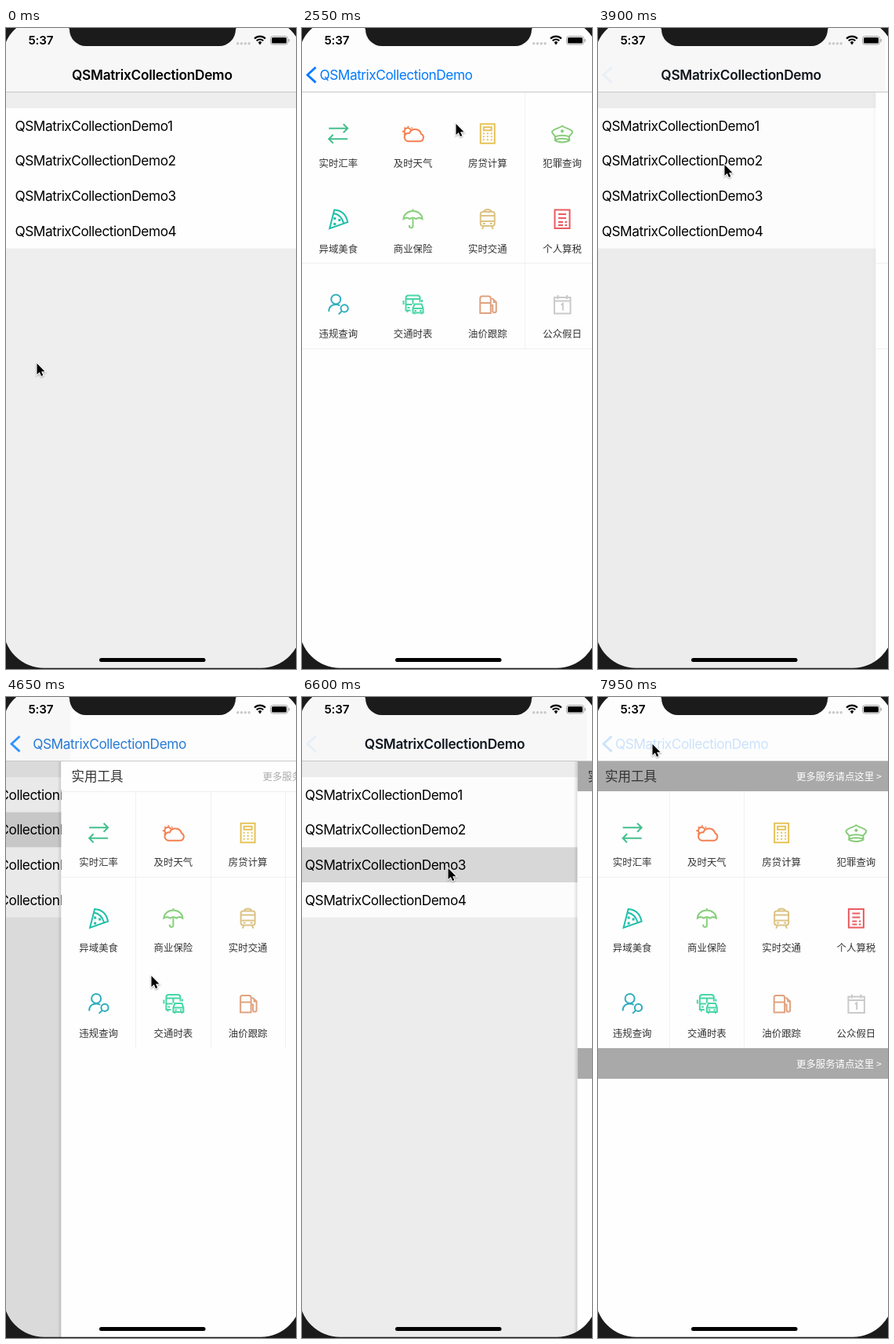
An HTML page with a canvas that plays this animation: 370 by 816 pixels, repeating every 8000 ms.

```html
<!DOCTYPE html>
<html lang="zh-CN">
<head>
<meta charset="utf-8">
<title>QSMatrixCollectionDemo</title>
<style>
html, body { margin: 0; width: 100%; height: 100%; overflow: hidden; background: #1b1b1b; }
canvas { display: block; width: 370px; height: 816px; }
</style>
</head>
<body>
<canvas id="stage" width="370" height="816"></canvas>
<script>
const ctx = document.getElementById('stage').getContext('2d');
const LOOP = 8000, STEP = 150;
const LEFT = -4, WIDTH = 381, CELL_W = WIDTH / 4, CELL_H = 108.8;
const ROW_TOP = 102, ROW_H = 44.65, NAV_H = 82;
const LATIN = 'Inter, "Open Sans", sans-serif';
const CJK = '"Noto Sans CJK SC", "Noto Sans CJK", sans-serif';
const TITLE = 'QSMatrixCollectionDemo';
const MORE = '更多服务请点这里 >';
const BLACK = '#1b1b1b';

// label, colour, stroked path, filled path; all centred on 0,0
const ICONS = [
  ['实时汇率', '#45bf8d', 'M-12-6.5H12M6.5-12L12-6.5L6.5-1M12 7H-12M-6.5 1.5L-12 7L-6.5 12.5'],
  ['及时天气', '#f57f50',
    'M-6.5 10H9A5 5 0 0 0 10.5.5A8 8 0 0 0-4.5-.5A5.3 5.3 0 0 0-6.5 10Z' +
    'M-9.5.5A4.3 4.3 0 1 1-2.5-4M-6-9.5V-8M-11-7.5L-10-6.5M-13.5-2.5H-11.5M-11.5 2L-10.5 1M-1-7.5L-2-6.5'],
  ['房贷计算', '#e6c358', 'M-9-12H9V12.5H-9ZM-5-8H5V-4H-5Z',
    [-1, 3, 7].map(y => [-6, -1, 4].map(x => `M${x} ${y}h2v2h-2z`).join('')).join('')],
  ['犯罪查询', '#86cb78',
    'M-13-2C-12-6-5-6 0-9.5C5-6 12-6 13-2C13 1 9 2 9 4Q0 1-9 4C-9 2-13 1-13-2Z' +
    'M-9 4V8Q0 5 9 8V4M-10 8.5C-5 12 5 12 10 8.5', 'M0-5.5L2.5-3L0-.5L-2.5-3Z'],
  ['异域美食', '#1fbfaa', 'M-11 12L-5-11.5C4-11 10-5 12 4ZM-6-7C1-6 5-1 7 5.5',
    'M-6-2h3v3h-3zM0 0h3v3h-3zM-6 5h3v3h-3z'],
  ['商业保险', '#88d07c',
    'M-12 0A12 10 0 0 1 12 0Q8-3 4 0Q0-3-4 0Q-8-3-12 0ZM0-12.5V-10M0 0V9A2.3 2.3 0 0 1-4.6 9V8'],
  ['实时交通', '#dcc383',
    'M-6-9H6Q9-9 9-6V6Q9 9 6 9H-6Q-9 9-9 6V-6Q-9-9-6-9ZM-5-9Q-4-12 0-12Q4-12 5-9' +
    'M-9-4H9M-9 3H9M-5 9L-7 13M5 9L7 13', 'M-6 5h3v2h-3zM3 5h3v2h-3z'],
  ['个人算税', '#e95b60', 'M-9.5-11.5H9.5V12H-9.5ZM-5-6H5M-5-1H5M-5 4H1M3.5 4H6M-5 8H1M3.5 8H6'],
  ['违规查询', '#2eaebd',
    'M3-6.5A6 6 0 1 1-9-6.5A6 6 0 1 1 3-6.5ZM-12 9C-12 2-7 0-3 0Q0 0 2 1.5' +
    'M12.5 5A4.6 4.6 0 1 1 3.3 5A4.6 4.6 0 1 1 12.5 5ZM4.5 8.5L.5 12.5'],
  ['交通时表', '#48d6a5',
    'M-3 7.5H-9V-8Q-9-11.5-6-11.5H6Q9-11.5 9-8V-3M-12-5V0M11.5-6V-3M-9-7H9M-9 0H-1M0-7V-1M-7 8V10M-7 4H-4' +
    'M0 5L2-.5H11L13 5V10.5H0ZM0 5H13M2 11V12.5M11 11V12.5', 'M2 7h2.5v2h-2.5zM8.5 7h2.5v2h-2.5z'],
  ['油价跟踪', '#dfa27f',
    'M-9.5 11V-8Q-9.5-10.5-7-10.5H1.5Q4-10.5 4-8V11ZM-9.5-2H4M4 1H6.5V8A2.2 2.2 0 0 0 11 8V-3L5.5-8M11-3H8V-5'],
  ['公众假日', '#cacaca', 'M-10-9H10.5V11.5H-10ZM-10-4.5H10.5M-5.5-12V-7M6-12V-7M-1.5.5L.8-1V7.5']
].map(([label, color, line, fill]) =>
  ({ label, color, line: new Path2D(line), fill: fill && new Path2D(fill) }));

const PAGES = [
  { top: 82, cols: [3], lines: [2, 3] },
  { top: 120.5, cols: [1, 2, 3], lines: [0, 1], header: '#fefefe', title: '#333', more: '#aaa' },
  { top: 120.5, cols: [1, 2], lines: [1], header: '#a9a9a9', title: '#333', more: '#fff', footer: true }
];

// page index, row press, push start, back press, pop start
const VISITS = [
  [0, 2100, 2130, 3600, 3630],
  [1, 4350, 4470, 5700, 5719],
  [2, 6450, 6575, 7900, 9000]
];

// time, x, y of the pointer tip
const PATH = [
  [0, 39, 427], [1050, 196, 122], [2700, 196, 122], [3450, 69, 61], [3630, 69, 61],
  [3900, 161, 174], [4450, 162, 175], [4650, 185, 355], [5000, 185, 340], [5500, 70, 61],
  [5710, 70, 61], [5850, 167, 176], [6300, 186, 217], [6600, 186, 218], [7200, 190, 247], [7950, 69, 60]
];

const lerp = (a, b, k) => a + (b - a) * k;
const smooth = k => k * k * (3 - 2 * k);

function spring(ms) {
  if (ms <= 0) return 0;
  if (ms > 650) return 1;
  const k = ms * 0.0168;
  return 1 - (1 + k) * Math.exp(-k);
}

function rect(x, y, w, h, color) {
  ctx.fillStyle = color;
  ctx.fillRect(x, y, w, h);
}

function round(x, y, w, h, r, color) {
  ctx.fillStyle = color;
  ctx.beginPath();
  ctx.roundRect(x, y, w, h, r);
  ctx.fill();
}

function text(str, x, y, font, color, spacing = 0, align = 'left') {
  ctx.font = font;
  ctx.letterSpacing = spacing + 'px';
  ctx.textAlign = align;
  ctx.fillStyle = color;
  ctx.fillText(str, x, y);
}

function drawList(shift, pressed) {
  rect(0, NAV_H, 370, 734, '#eee');
  rect(0, ROW_TOP, 370, ROW_H * 4, '#fefefe');
  for (let i = 0; i < 4; i++) {
    const y = ROW_TOP + ROW_H * i;
    if (i === pressed) rect(0, y, 370, ROW_H, '#d9d9d9');
    text(TITLE + (i + 1), 11.5 + shift, y + 28.7, '17.27px ' + LATIN, '#000', -0.46);
  }
}

function drawIcon(icon, x, y) {
  ctx.save();
  ctx.translate(x, y);
  ctx.strokeStyle = ctx.fillStyle = icon.color;
  ctx.lineWidth = 2;
  ctx.stroke(icon.line);
  if (icon.fill) ctx.fill(icon.fill);
  ctx.restore();
}

function drawPage(page, x) {
  rect(x, NAV_H, WIDTH, 734, '#fefefe');
  for (const c of page.cols) rect(Math.round(x + CELL_W * c - 0.5), page.top, 1, CELL_H * 3, '#f1f1f1');
  for (const r of page.lines) rect(x, Math.floor(page.top + CELL_H * r), WIDTH, 1, '#f0f0f0');
  if (page.header) {
    rect(x, NAV_H, WIDTH, 38, page.header);
    text('实用工具', x + 13, 106.8, '16.5px ' + CJK, page.title);
    text(MORE, x + 257, 105.5, '12.4px ' + CJK, page.more);
  }
  if (page.footer) {
    rect(x, 447, WIDTH, 39, page.header);
    text(MORE, x + 257, 471.5, '12.4px ' + CJK, page.more);
  }
  ICONS.forEach((icon, i) => {
    const cx = x + CELL_W * (i % 4 + 0.5);
    const y = page.top + CELL_H * Math.floor(i / 4);
    drawIcon(icon, cx, y + 52.3);
    text(icon.label, cx, y + 94.8, '12.4px ' + CJK, '#333', 0, 'center');
  });
}

function drawShade(x, p, popping) {
  rect(0, NAV_H, x, 734, `rgba(0,0,0,${0.1 * p})`);
  const edge = 0.13 * (popping ? Math.min(1, 3 * p) : 1);
  const g = ctx.createLinearGradient(x - 5, 0, x, 0);
  g.addColorStop(0, 'rgba(0,0,0,0)');
  g.addColorStop(1, `rgba(0,0,0,${edge})`);
  rect(x - 5, NAV_H, 5, 734, g);
}

function drawNav(x, p, backDown) {
  rect(0, 0, 370, NAV_H, '#fdfdfd');
  rect(0, 0, Math.max(0, x + Math.min(12, 60 * (1 - p))), NAV_H, '#f7f7f7');
  rect(0, 81, 370, 1, '#c8c8c8');
  const dim = backDown ? 0.2 : 1;
  ctx.globalAlpha = p * dim;
  ctx.strokeStyle = '#007aff';
  ctx.lineWidth = 2.8;
  ctx.stroke(new Path2D('M17.5 50L7 59.7L17.5 69.4'));
  ctx.globalAlpha = (1 - p * (1 - p)) * dim;
  const weight = Math.round(lerp(600, 400, p));
  text(TITLE, lerp(84, 22, p), 65.7, `${weight} 17.27px ${LATIN}`,
    `rgb(0,${Math.round(122 * p)},${Math.round(255 * p)})`, lerp(-0.28, -0.46, p));
  ctx.globalAlpha = 1;
}

function drawStatus() {
  text('5:37', 28.5, 21.2, '600 15.2px ' + LATIN, '#000', -0.2);
  for (let i = 0; i < 4; i++) round(294 + i * 4.8, 18, 3.4, 3.4, 1.7, '#c9c9c9');
  ctx.strokeStyle = '#000';
  ctx.lineWidth = 2.2;
  for (const r of [6, 9.8]) {
    ctx.beginPath();
    ctx.arc(324, 20.5, r, -Math.PI * 0.75, -Math.PI * 0.25);
    ctx.stroke();
  }
  ctx.fillStyle = '#000';
  ctx.beginPath();
  ctx.moveTo(324, 21.5);
  ctx.arc(324, 20.5, 3.2, -Math.PI * 0.75, -Math.PI * 0.25);
  ctx.fill();
  ctx.strokeStyle = '#a2a2a2';
  ctx.lineWidth = 1;
  ctx.beginPath();
  ctx.roundRect(337.5, 10.5, 22, 10.5, 3);
  ctx.stroke();
  round(339, 12, 19, 7.5, 1.6, '#000');
  round(360.6, 14, 1.3, 3.6, 0.6, '#a2a2a2');
}

function drawDevice() {
  round(119, 802, 135.5, 5, 2.5, '#000');
  ctx.fillStyle = BLACK;
  ctx.fill(new Path2D('M79.5 0Q81 0 81 2A21 21 0 0 0 102 23H272A21 21 0 0 0 293 2Q293 0 294.5 0Z'));
  ctx.beginPath();
  ctx.rect(-20, -20, 410, 856);
  ctx.roundRect(-3.5, -10.5, 380.5, 825.3, [46, 46, 52, 52]);
  ctx.fill('evenodd');
}

function drawPointer(t) {
  let i = 1;
  while (i < PATH.length - 1 && t > PATH[i][0]) i++;
  const [t0, x0, y0] = PATH[i - 1], [t1, x1, y1] = PATH[i];
  const k = smooth(Math.min(1, (t - t0) / (t1 - t0)));
  const arrow = new Path2D('M0 0V14L3.3 11L5.5 16L7.8 15L5.6 10.2H10Z');
  ctx.save();
  ctx.translate(lerp(x0, x1, k) + 0.5, lerp(y0, y1, k));
  ctx.shadowColor = 'rgba(0,0,0,.35)';
  ctx.shadowBlur = 2;
  ctx.shadowOffsetY = 1;
  ctx.strokeStyle = '#fff';
  ctx.lineWidth = 2;
  ctx.stroke(arrow);
  ctx.shadowColor = 'transparent';
  ctx.fillStyle = '#000';
  ctx.fill(arrow);
  ctx.restore();
}

function draw(t) {
  const visit = VISITS.find(v => t >= v[1] && t < v[4] + 650);
  let p = 0, pressed = -1, backDown = false, popping = false;
  if (visit) {
    const [row, press, push, back, pop] = visit;
    popping = t >= pop;
    p = spring(t - push) - spring(t - pop);
    if (!popping) pressed = row;
    backDown = t >= back && !popping;
  }
  const x = LEFT + WIDTH * (1 - p);
  drawList(-0.3 * WIDTH * p, pressed);
  if (p > 0) {
    if (p < 1) drawShade(x, p, popping);
    drawPage(PAGES[visit[0]], x);
  }
  drawNav(x, p, backDown);
  drawStatus();
  drawDevice();
  drawPointer(t);
}

const start = performance.now();
function tick() {
  const t = (performance.now() - start) % LOOP;
  draw(Math.floor(t / STEP) * STEP);
  requestAnimationFrame(tick);
}
tick();
</script>
</body>
</html>
```
